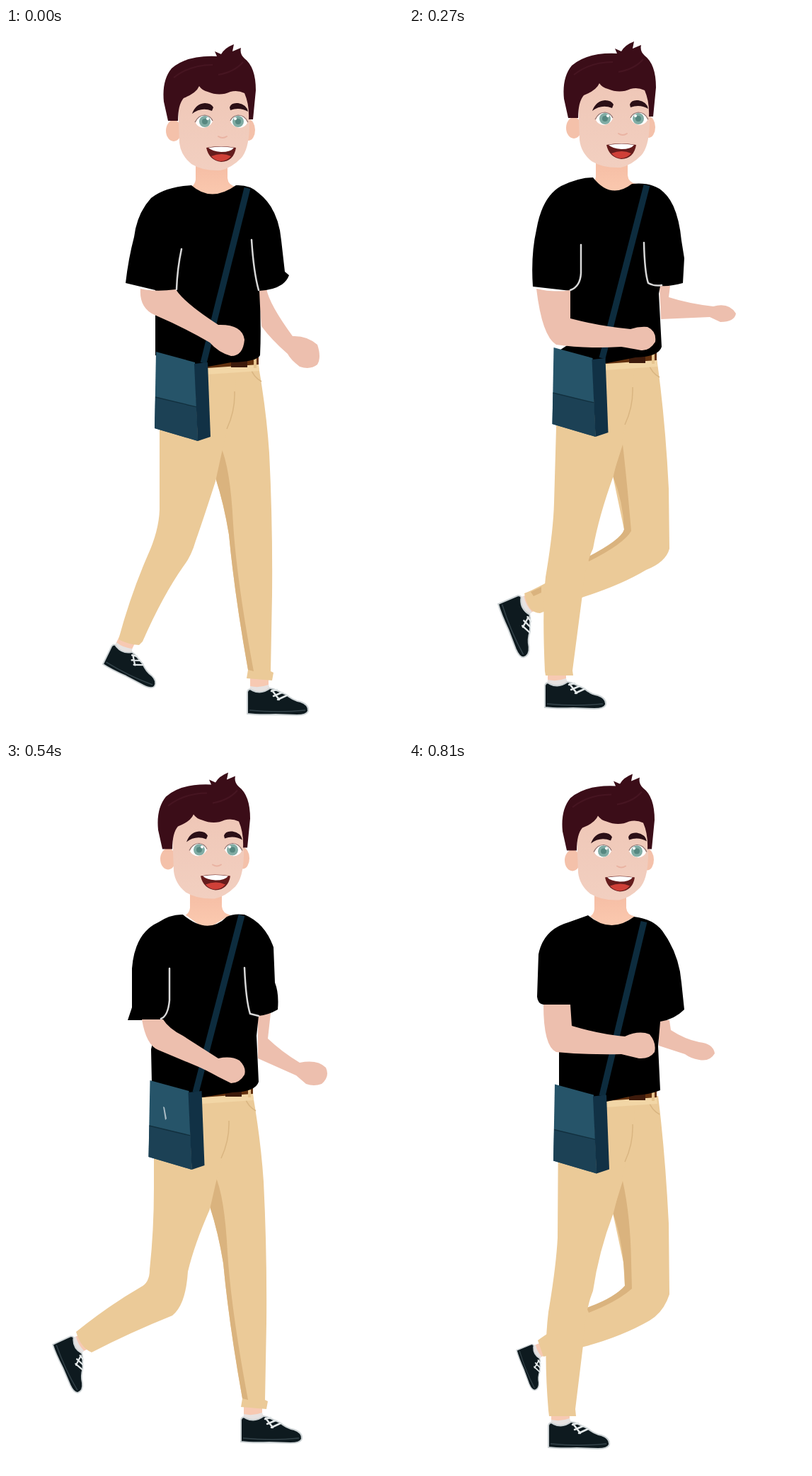
An HTML page for the animation above (1.08 s loop, 561 px wide and 998 px high).

```html
<!DOCTYPE html>
<html lang="en">
<head>
<meta charset="utf-8">
<title>Walking man</title>
<style>
html, body { margin: 0; height: 100%; overflow: hidden; background: #fff }
svg { display: block; width: 100%; height: 100%; filter: blur(.7px) }
.skin { fill: #edbfae }
.pants { fill: #ebca98 }
.shade { fill: #dab37e }
.crease { fill: none; stroke: #d9b581; stroke-width: 1.5 }
.trim { fill: none; stroke: #d8d8d8; stroke-width: 2.5; stroke-linecap: round }
.strap { stroke: #0d2c3e; stroke-width: 9 }
.brow { fill: #2b0f16 }
.white { fill: #fff }
</style>
</head>
<body>
<svg id="stage" viewBox="0 0 561 998">
  <defs>
    <linearGradient id="face" x1="0" y1="0" x2="0" y2="1">
      <stop offset="0" stop-color="#efc7b7"/>
      <stop offset="1" stop-color="#f2cfc0"/>
    </linearGradient>
    <linearGradient id="neck" x1="0" y1="0" x2="0" y2="1">
      <stop offset=".3" stop-color="#f6bfa6"/>
      <stop offset="1" stop-color="#fccbb1"/>
    </linearGradient>

    <g id="shoe">
      <path fill="#f7c9b2" d="M4-57H30V-33H4Z"/>
      <path fill="#e6e2e1" d="M4-39Q17-36 30-41L33-33Q18-24 3-31Z"/>
      <path fill="#0e1a1f" stroke="#ccd2d4" stroke-width="2" d="M0-31Q2-37 7-33Q20-27 32-36L37-35L55-27Q64-19 75-17Q87-13 86-4Q84 2 70 2L40 1Q15 2 0 0Z"/>
      <path fill="none" stroke="#34434a" stroke-width="1.5" d="M3-5Q45-1 82-5"/>
      <path fill="none" stroke="#e3e8e9" stroke-width="2.5" stroke-linecap="round" d="M34-32L42-34M37-25L49-30M43-20L56-26M35-33L45-20"/>
    </g>

    <g id="neckShape">
      <path fill="url(#neck)" d="M268 180V214Q267 221 262 224L290 245L325 224Q314 222 313 212V180Z"/>
    </g>

    <g id="head">
      <ellipse fill="#f4c1aa" cx="237" cy="145" rx="11" ry="15"/>
      <ellipse fill="#f4c1aa" cx="343" cy="144" rx="9" ry="15"/>
      <path fill="url(#face)" d="M242 80H344V140Q343 172 332 184Q318 198 303 201Q278 202 262 192Q247 180 245 162Z"/>
      <path fill="#3b0d18" d="M229 131L223 104Q220 74 234 57Q256 38 298 40L295 33L304 37Q309 28 322 23L320 33L332 28Q330 37 337 43Q353 55 353 88L349 129H343Q344 108 337 92Q327 87 317 90Q302 97 285 90Q277 88 273 82Q269 92 251 99Q243 108 243 131Z"/>
      <path fill="none" stroke="#572231" stroke-width="2" opacity=".4" d="M237 70Q260 52 292 52M300 66Q323 62 335 48"/>
      <path class="brow" d="M263 121Q268 107 281 106Q290 106 293 112L291 117Q276 111 263 121ZM316 112Q318 105 328 106Q340 108 342 118Q330 111 317 116Z"/>
      <g id="eye">
        <path class="white" d="M268 134Q272 123 281 123Q289 124 292 132Q288 140 279 141Q271 140 268 134Z"/>
        <circle fill="#80aca4" cx="281" cy="132" r="8"/>
        <circle fill="#568780" cx="281" cy="132" r="4"/>
        <circle class="white" cx="285" cy="128" r="2"/>
        <path fill="none" stroke="#8d7270" stroke-width="1.2" d="M267 133Q272 123 281 123Q289 124 292 131"/>
      </g>
      <use href="#eye" transform="translate(609) scale(-1 1)"/>
      <path fill="none" stroke="#e9b3a2" stroke-width="2" stroke-linecap="round" d="M300 153Q306 157 312 153"/>
      <path fill="#651c1c" d="M283 169Q303 165 325 169Q322 188 304 189Q287 187 283 169Z"/>
      <path class="white" d="M286 169Q304 166 322 169Q318 175 304 175Q291 174 286 169Z"/>
      <path fill="#cf4038" d="M290 181Q305 175 318 181Q312 188 303 188Q295 187 290 181Z"/>
    </g>

    <g id="bag">
      <path fill="#265469" d="M212 457L267 472L271 583L210 565Z"/>
      <path fill="#1c4155" d="M211 521L269 536L271 583L210 565Z"/>
      <path fill="none" stroke="#12303f" stroke-width="1.5" d="M211 521L269 535"/>
      <path fill="#113145" d="M266 474L285 472L289 577L271 583Z"/>
    </g>

    <g id="waist">
      <path class="crease" d="M323 513Q324 540 312 566M346 481Q350 493 361 499"/>
      <path fill="#f2d6a6" d="M285 479L357 474L358 484L285 489Z"/>
      <path fill="#63310f" d="M285 462H357V475L285 480Z"/>
      <path fill="#3d1a0b" d="M318 470H341V479H318Z"/>
      <path fill="#e6c48f" d="M350 465H354V480H350Z"/>
    </g>
  </defs>
</svg>
<script>
const STEP = 270;

const straightLeg = {
  leg: "M285 472L356 472Q368 540 372 600Q377 700 376 800L374 908L378 910L376 921L340 918L342 906Q323 800 315 715Q308 672 296 635L285 600Z",
  shade: "M296 635L303 590Q317 620 321 700Q326 780 350 908L342 906Q323 800 315 715Q308 672 296 635Z"
};

// Shoes are [x, y, turn, scale], measured at the sole under the heel.
const poses = [
  {
    head: [0, 0], hip: [0, 0], bag: [0, 0], far: straightLeg, farAt: [0, 0],
    farShoe: [341, 968, 0, 1], nearShoe: [137, 898, 26, .92],
    near: "M217 500L285 476L325 480Q326 530 315 560Q304 600 296 640Q280 690 268 724Q262 745 252 758Q222 800 193 866L188 871Q172 870 159 863Q176 800 200 745Q216 710 217 680Z",
    shirt: "M262 222Q290 247 325 222Q345 221 357 233Q385 255 389 300L394 344L400 349Q397 357 390 362Q378 370 358 371Q361 420 359 462Q355 471 318 472L275 480L211 462V370L169 360Q173 325 181 295Q185 262 205 240Q225 224 262 222Z",
    arm: "M190 368Q210 373 240 369Q252 388 300 419Q334 418 337 440Q335 463 318 463Q300 458 288 444Q250 422 210 405Q188 395 190 368Z",
    farArm: "M357 371L368 368Q372 390 405 435Q425 434 440 447Q446 465 440 475Q430 483 415 478Q402 468 398 460Q375 440 361 421Z",
    trim: "M248 312Q242 340 241 369M347 299Q350 345 357 370",
    strap: "M341 226L279 473"
  },
  {
    head: [-4, -4], hip: [-7, -6], bag: [-7.5, -6], farAt: [0, 0],
    far: {
      leg: "M280 466H350Q362 550 367 650L368 735Q363 754 335 765Q300 786 247 803L185 826Q168 826 163 798Q185 790 255 748Q300 722 304 708L288 632Z",
      shade: "M288 632L302 588Q308 640 314 710Q304 728 254 753L252 747Q300 722 304 708Q303 670 288 632ZM172 796L187 789V797L176 802Z"
    },
    farShoe: [126, 813, 67, .97], nearShoe: [192, 959, 0, 1],
    near: "M210 494L280 470L318 474Q319 525 308 555Q297 595 289 632Q268 690 260 735Q248 760 245 800L231 907L232 914H193L192 908Q188 820 193 775Q204 710 205 670Z",
    shirt: "M260 211Q285 243 315 220Q345 217 360 232Q380 250 385 300L389 325L387 360Q370 365 355 364L353 375L357 450Q353 464 320 465L270 475L208 458L228 445V371L175 365Q172 320 180 285Q188 238 215 223Q240 211 260 211Z",
    arm: "M180 368Q205 374 228 370V410Q270 421 313 425Q325 421 337 422Q350 428 348 443Q340 456 328 455Q312 452 300 450Q250 453 208 447Q188 435 180 368Z",
    farArm: "M354 364H369L367 380Q395 389 430 393Q452 387 462 403Q460 415 440 415L425 408L356 411Z",
    trim: "M243 306V346Q242 365 228 370M332 303Q333 345 338 360Q347 365 357 363",
    strap: "M336 222L273 466"
  },
  {
    head: [-8, -9.5], hip: [-8, -8], bag: [-8.5, -9], far: straightLeg, farAt: [-8, -9],
    farShoe: [332, 958, 0, 1], nearShoe: [66, 821, 65, .89],
    near: "M209 492L279 468L317 472Q318 525 307 553Q296 592 288 630Q266 680 257 718Q254 765 235 780Q175 804 121 832Q106 826 99 803Q145 766 190 740Q203 734 203 715Q209 660 209 600Z",
    shirt: "M250 214Q285 244 312 217Q322 212 337 214Q366 226 378 260L380 310Q386 325 384 348Q370 356 357 357L354 385L357 450Q353 464 320 465L265 474L206 452L205 404L215 363H172L178 345V290Q182 240 215 225Q233 213 250 214Z",
    arm: "M192 362H222Q230 375 250 385L300 417Q318 413 330 420Q340 430 337 440Q330 452 318 452L300 443Q280 432 270 428L215 405Q198 398 192 362Z",
    farArm: "M356 354L374 353L370 389Q390 408 415 423Q440 418 452 430Q458 443 446 453Q435 457 424 453L410 441L356 417Z",
    trim: "M231 290V335Q229 357 219 361M337 289Q339 335 345 354L357 357",
    strap: "M333 215L268 465",
    mark: "M222 485L225 504L227 502L224 486Z"
  },
  {
    head: [-6, -7.5], hip: [-7, -3], bag: [-6, -3.5], farAt: [0, 0],
    far: {
      leg: "M282 469L352 470Q362 550 367 650L368 750Q360 775 340 787Q300 810 247 824L190 838L182 815Q195 805 250 772Q290 755 305 738L303 705L288 635Z",
      shade: "M288 635L302 590Q313 640 314 705L315 742Q295 760 254 776L251 769Q290 755 305 738Q304 680 288 635Z"
    },
    farShoe: [152, 829, 68, .72], nearShoe: [197, 966, 0, 1],
    near: "M211 497L281 473L319 477Q319 528 308 558Q298 598 289 635Q268 690 260 745Q248 775 246 822L235 912L236 922H198L197 914Q190 830 197 775Q208 710 210 670Z",
    shirt: "M253 215Q285 242 318 217Q345 220 358 237Q382 270 385 310L389 348Q375 362 355 365L352 400L355 462Q340 468 320 469L270 480L212 460V341H190Q182 340 181 330L183 270Q190 235 225 225Z",
    arm: "M190 341H228L230 371Q270 383 305 386Q325 377 340 383Q350 395 347 408Q340 418 325 417L300 411Q250 412 208 408Q190 400 190 341Z",
    farArm: "M353 363H368L370 377Q390 390 410 394Q430 396 432 410Q425 422 410 419Q398 417 390 411L353 399Z",
    trim: "",
    strap: "M332 224L273 470"
  }
];

const path = (cls, d, extra = "") => `<path class="${cls}" d="${d}" ${extra}/>`;
const part = (id, at) => `<use href="#${id}" transform="translate(${at})"/>`;
const shoe = ([x, y, turn, size]) =>
  `<use href="#shoe" transform="translate(${x} ${y}) rotate(${turn}) scale(${size})"/>`;

const draw = p => `<g>
  ${shoe(p.farShoe)}
  <g transform="translate(${p.farAt})">${path("pants", p.far.leg)}${path("shade", p.far.shade)}</g>
  ${shoe(p.nearShoe)}
  ${path("pants", p.near)}
  ${part("waist", p.hip)}
  ${path("skin", p.farArm)}
  ${part("neckShape", p.head)}
  ${path("shirt", p.shirt)}
  ${path("strap", p.strap)}
  ${part("bag", p.bag)}
  ${path("white", p.mark || "", 'opacity=".6"')}
  ${path("skin", p.arm)}
  ${path("trim", p.trim)}
  ${part("head", p.head)}
</g>`;

const layers = poses.map(p => {
  stage.insertAdjacentHTML("beforeend", draw(p));
  return stage.lastElementChild;
});

const start = performance.now();
function tick() {
  const now = Math.floor((performance.now() - start) / STEP) % poses.length;
  layers.forEach((layer, i) => layer.style.display = i === now ? "" : "none");
  requestAnimationFrame(tick);
}
tick();
</script>
</body>
</html>
```
